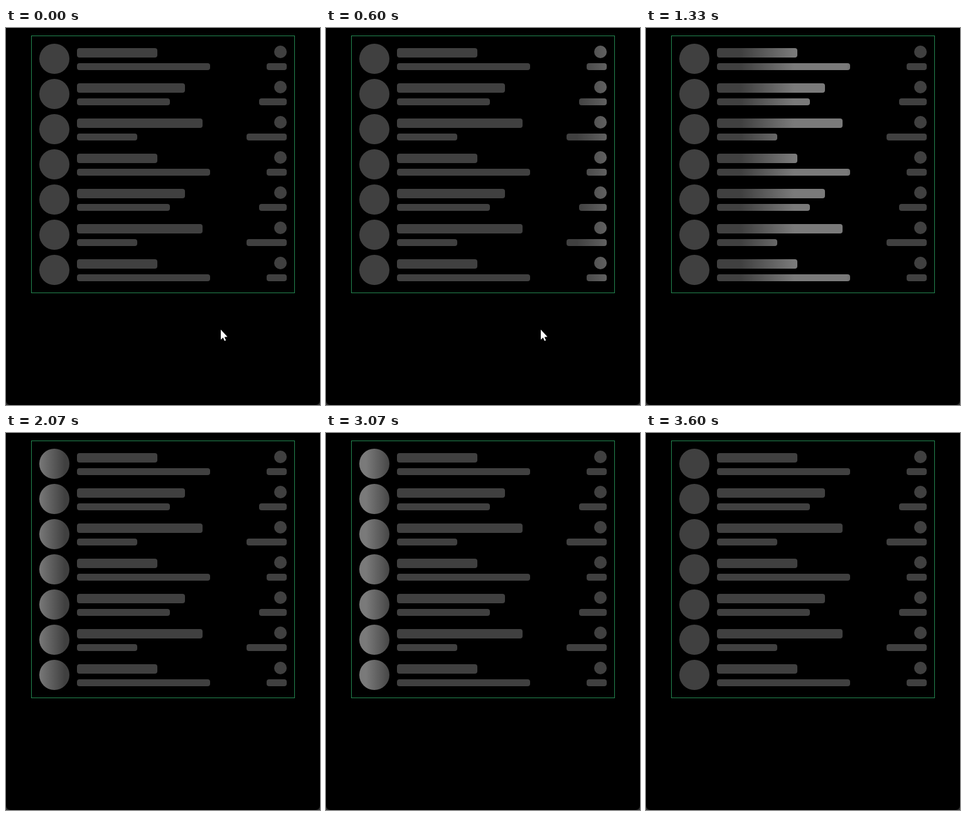
Recreate the animation shown at these times as an HTML page with a canvas. Size 500 by 600 pixels, loop 3990 ms.

```html
<!DOCTYPE html>
<html lang="en">
<head>
<meta charset="utf-8">
<title>Skeleton list</title>
<style>
  html, body { margin: 0; width: 100%; height: 100%; overflow: hidden; background: #000; }
  canvas { display: block; }
</style>
</head>
<body>
<canvas id="stage" width="500" height="600"></canvas>
<script>
const ctx = document.getElementById('stage').getContext('2d');
const LOOP = 3990;
const BASE = '#404040';
const LIGHT = '#7a7a7a';
const ROWS = 7;
const ROW_STEP = 56;
// title, subtitle and trailing bar widths, repeating every three rows
const WIDTHS = [[128, 212, 32], [172, 148, 44], [200, 96, 64]];
const ARROW = [[0, 0], [0, 16], [3.6, 12.8], [6, 18], [8.2, 17], [5.8, 11.8], [10.6, 11.5]];

// The picture advances 15 times a second, on whole hundredths of a second.
const tickAt = ms => Math.floor((Math.floor(ms / 10) + 0.5) * 0.15);

// Left edge of the light band; one slightly accelerating sweep per second.
function bandStart(tick) {
  const sweep = Math.floor(tick / 15);
  const step = tick % 15;
  let u = step - 1;
  if (sweep > 0) u += 0.18 * (sweep - 2);
  else if (step > 5) u -= 1; // short stall in the first sweep
  return 1.15 * u * u + 65.6 * u - 116;
}

function shimmer(x) {
  const g = ctx.createLinearGradient(x, 0, x + 210, 0);
  g.addColorStop(0, BASE);
  g.addColorStop(0.4, LIGHT);
  g.addColorStop(0.8, LIGHT);
  g.addColorStop(1, BASE);
  return g;
}

function dot(x, y, r) {
  ctx.beginPath();
  ctx.arc(x, y, r, 0, Math.PI * 2);
  ctx.fill();
}

function bar(x, y, w, h) {
  ctx.beginPath();
  ctx.roundRect(x, y, w, h, 4);
  ctx.fill();
}

function drawWindow() {
  ctx.fillStyle = '#303030';
  ctx.fillRect(0, 0, 500, 600);
  ctx.fillStyle = '#000';
  ctx.beginPath();
  ctx.roundRect(0, 0, 500, 600, [0, 0, 7, 7]);
  ctx.fill();
  ctx.strokeStyle = '#238750';
  ctx.lineWidth = 1;
  ctx.strokeRect(40.5, 12.5, 419, 409);
}

function drawList(tick) {
  ctx.fillStyle = shimmer(bandStart(tick));
  for (let i = 0; i < ROWS; i++) {
    const y = 25 + i * ROW_STEP;
    const [title, subtitle, trailing] = WIDTHS[i % 3];
    dot(77, y + 24, 24);
    bar(113, y + 7, title, 15);
    bar(113, y + 31, subtitle, 11);
    dot(437, y + 13, 10);
    bar(447 - trailing, y + 31, trailing, 11);
  }
}

function drawCursor(tick) {
  const t = Math.max(0, tick / 15 - 0.7);
  const y = 480 + 960 * t * t;
  if (y > 600) return;
  ctx.fillStyle = '#fff';
  ctx.beginPath();
  for (const [dx, dy] of ARROW) ctx.lineTo(342 + dx, y + dy);
  ctx.fill();
}

const start = performance.now();

function draw() {
  const tick = tickAt((performance.now() - start) % LOOP);
  drawWindow();
  drawList(tick);
  drawCursor(tick);
  requestAnimationFrame(draw);
}
draw();
</script>
</body>
</html>
```
